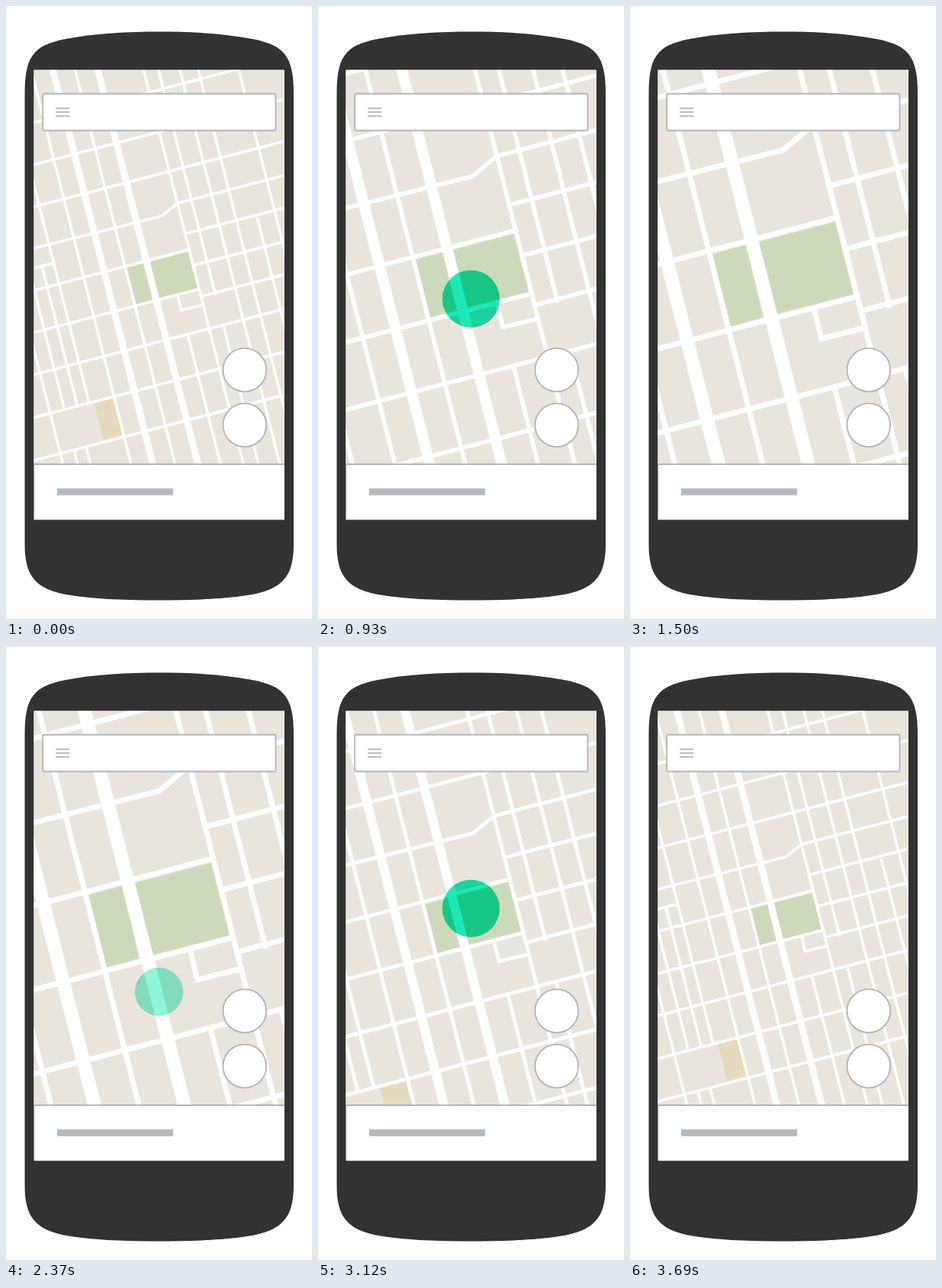
An HTML page that plays this animation: 400 px wide and 800 px high, repeating every 5.22 s.

```html
<!DOCTYPE html>
<html lang="en">
<head>
<meta charset="utf-8">
<title>One-finger map zoom</title>
<style>
  html, body { margin: 0; width: 100%; height: 100%; overflow: hidden; background: #fff; }
  svg { display: block; width: 100vw; height: 100vh; }
  .road { fill: none; stroke: #fff; stroke-width: 3.5; }
  .avenue { stroke-width: 8.8; }
  .park { fill: #cddaba; }
  .plaza { fill: #e5dabd; }
  .card { fill: #fff; stroke: #b0b5ba; stroke-width: 1.8; }
  #touch { fill: #1de9b6; mix-blend-mode: multiply; }
</style>
</head>
<body>
<svg viewBox="0 0 400 800">
  <defs><clipPath id="screen"><path d="M36.5 83.5H364V598H36.5Z"/></clipPath></defs>
  <path fill="#323232" d="M24.5 114C24.5 66 36 51 78 43C118 35.5 160 33.5 200 33.5S282 35.5 322 43C364 51 376 66 376 114V702C376 744 362 760 322 768C282 774.5 240 775.5 200 775.5S118 774.5 78 768C38 760 24.5 744 24.5 702Z"/>
  <path fill="#fff" d="M36.5 83.5H364V670.5H36.5Z"/>
  <g clip-path="url(#screen)">
    <path fill="#e9e5dc" d="M36 83H365V598H36Z"/>
    <g id="map">
      <path class="park" d="M158 342L180 336L191 383L170 389ZM188 334L238 321L250 368L199 381Z"/>
      <path class="plaza" d="M115 518L139 511L152 559L127 566Z"/>
      <g id="roads"></g>
    </g>
  </g>
  <circle id="touch" cx="200"/>
  <path d="M37 598H364" stroke="#b0b5ba" stroke-width="1.8"/>
  <rect class="card" x="48" y="114.5" width="304.5" height="48" rx="1.5"/>
  <path d="M65 133.5H83M65 138.5H83M65 143.5H83" stroke="#b8b8b8" stroke-width="1.8"/>
  <circle class="card" cx="312" cy="475" r="28.3"/>
  <circle class="card" cx="312" cy="547" r="28.3"/>
  <path fill="#b3b9c0" d="M67 629.5H218.5V638.5H67Z"/>
</svg>
<script>
const LOOP = 5220, STEP = 30;
const LEFT = 37, RIGHT = 366, TOP = 82, BOTTOM = 600;
const map = document.getElementById('map');
const touch = document.getElementById('touch');
const roads = document.getElementById('roads');

function road(d, cls = '') {
  const path = document.createElementNS('http://www.w3.org/2000/svg', 'path');
  path.setAttribute('class', 'road ' + cls);
  path.setAttribute('d', d);
  roads.append(path);
}

// x is taken at the top of the screen, y at its left edge.
function down(x, from = TOP, to = BOTTOM, cls = '') {
  const at = y => x + 0.254 * (y - 84);
  road(`M${at(from)} ${from}L${at(to)} ${to}`, cls);
}
function across(y, from = LEFT - 2, to = RIGHT) {
  const at = x => y - 0.262 * (x - LEFT);
  road(`M${from} ${at(from)}L${to} ${at(to)}`);
}

[152, 207, 262, 481, 537, 593].forEach(y => across(y));
across(371, LEFT - 2, 241);
across(426, LEFT - 2, 253);
across(342, LEFT - 2, 62);
[[349, 234], [393, 245], [436, 255]].forEach(([y, x]) => across(y, x));
road('M35 316.5L204 274L224 257.5L366 220.5');
road('M224.5 378L229 397L258 390');

[33, 90.5, 180, 227.5, 251.5, 304.5].forEach(x => down(x));
down(-1.5, 200, 517);
down(-18, 339, 521);
down(-36, 360, 524);
down(-56, 430);
down(-37, 580);
down(-20, 576);
down(199.5, TOP, 377);
down(199.5, 415);
down(279.5, 276);
down(150, 428);
down(61.5, TOP, BOTTOM, 'avenue');
down(120.3, TOP, BOTTOM, 'avenue');

const clamp = v => Math.min(1, Math.max(0, v));
const easeOut = u => 1 - (1 - clamp(u)) ** 2;

const gestures = [
  { press: 210, drag: 747, span: 497, release: 1380 },
  { press: 2370, drag: 2906, span: 535, release: 3570 }
];

function drawTouch(t, { press, release }, y) {
  const held = t - press;
  const gone = clamp((t - release + STEP) / 150);
  const spring = 1 - 0.16 * Math.exp(-held / 70) * Math.cos(held * Math.PI / 180);
  touch.setAttribute('cy', y);
  touch.setAttribute('r', held < 0 ? 0 : 37.5 * spring * (1 - 0.16 * gone));
  touch.setAttribute('opacity', held < 0 ? 0 : clamp(0.5 + held / 120) * (1 - gone));
}

function frame(now) {
  const t = Math.floor((now % LOOP) / STEP) * STEP;
  const [zoomIn, zoomOut] = gestures.map(g => easeOut((t - g.drag) / g.span));
  const zoom = zoomIn - zoomOut;
  map.setAttribute('transform', `translate(208 360) scale(${1 + zoom}) translate(-208 -360)`);
  drawTouch(t, gestures[t < gestures[1].press ? 0 : 1], 280 + 170 * zoom);
}

const start = performance.now();
function tick() {
  frame(performance.now() - start);
  requestAnimationFrame(tick);
}
tick();
</script>
</body>
</html>
```
